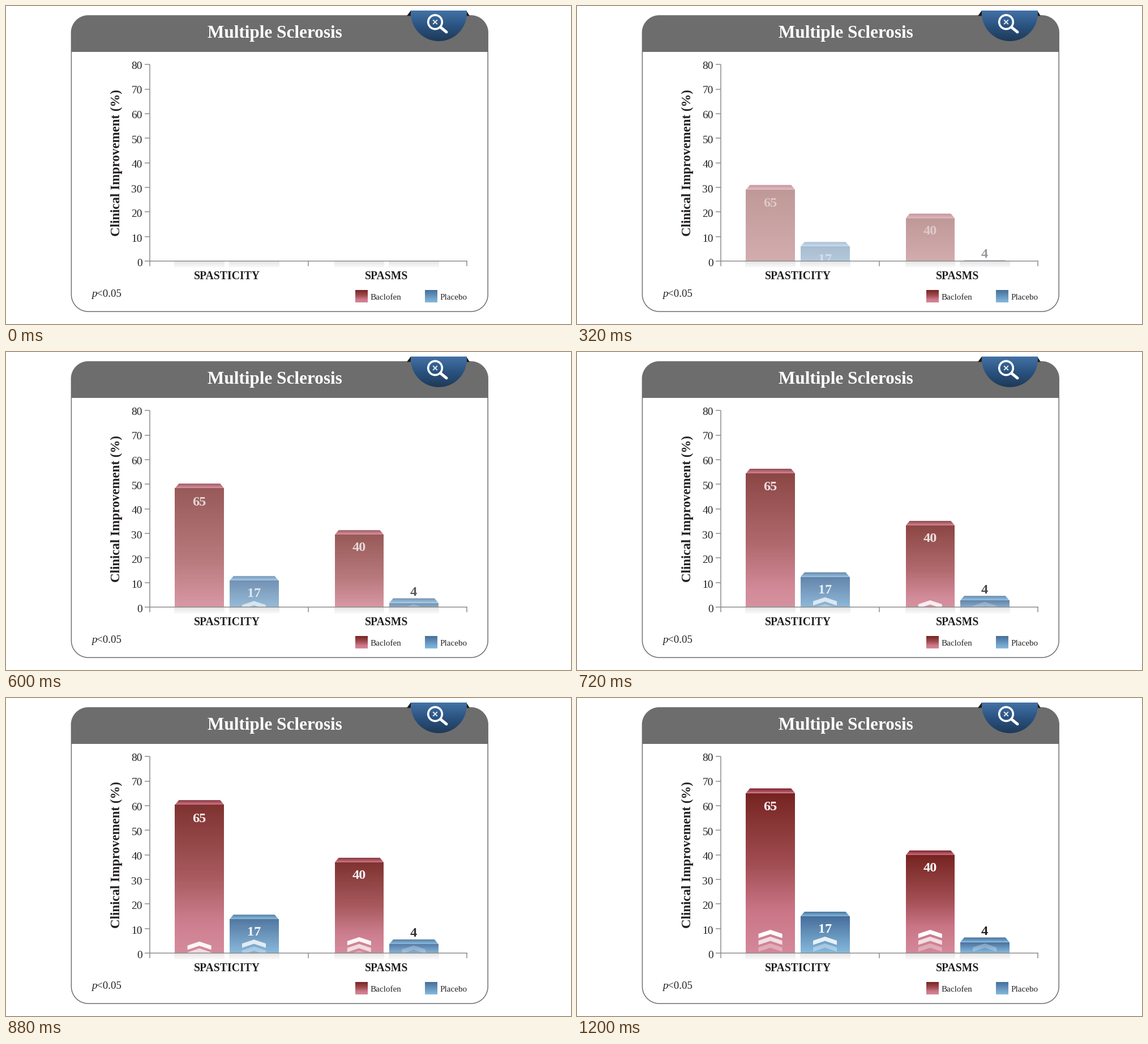
A matplotlib script that plays this animation: 998 px wide and 561 px high, repeating every 8 s.

```python
import numpy as np
import matplotlib.pyplot as plt
from matplotlib.animation import FuncAnimation
from matplotlib.patches import Circle, Polygon, Rectangle
from matplotlib.path import Path
from matplotlib.transforms import Affine2D

W, H, DPI = 998, 561, 64
STEP_MS, FRAMES, RISE = 40, 200, 30
BASE = 450

GREY = "#6d6d6d"
AXIS = "#8c8c8c"
INK = "#231f20"
RED = [(0, (118, 36, 33)), (.45, (162, 78, 83)), (.73, (202, 117, 134)), (1, (212, 137, 155))]
BLUE = [(0, (70, 110, 155)), (1, (134, 186, 222))]
RED_CAP = [(0, (112, 30, 34)), (1, (208, 108, 130))]
BLUE_CAP = [(0, (68, 108, 152)), (1, (130, 184, 220))]
BADGE = [(0, (68, 114, 166)), (.45, (44, 86, 132)), (1, (30, 57, 88))]
SHADE = [(0, (229, 229, 229)), (1, (249, 249, 249))]

plt.rcParams["font.family"] = "Liberation Serif"
fig = plt.figure(figsize=(W / DPI, H / DPI), dpi=DPI, facecolor="white")
ax = fig.add_axes([0, 0, 1, 1])
ax.set_xlim(0, W)
ax.set_ylim(H, 0)
ax.axis("off")


def px(size):
    return size * 72 / DPI


def gradient(points, stops, z, trans=None):
    """Fill a polygon with a vertical gradient."""
    trans = trans or ax.transData
    pts = np.array(points, float)
    (x0, y0), (x1, y1) = pts.min(0), pts.max(0)
    pos = [s[0] for s in stops]
    cols = np.array([s[1] for s in stops]) / 255
    t = np.linspace(0, 1, 256)
    ramp = np.stack([np.interp(t, pos, cols[:, k]) for k in range(3)], axis=1)
    image = ax.imshow(np.repeat(ramp[:, None], 2, axis=1), extent=(x0, x1, y1, y0),
                      aspect="auto", interpolation="nearest", zorder=z, transform=trans)
    image.set_clip_path(Path(np.vstack([pts, pts[:1]])), trans)


def box(x0, y0, x1, y1):
    return [(x0, y0), (x1, y0), (x1, y1), (x0, y1)]


def arc(cx, cy, r, start, end):
    a = np.radians(np.linspace(start, end, 60))
    return np.column_stack([cx + r * np.cos(a), cy + r * np.sin(a)])


def round_box(x0, y0, x1, y1, r):
    return np.vstack([arc(x1 - r, y1 - r, r, 0, 90), arc(x0 + r, y1 - r, r, 90, 180),
                      arc(x0 + r, y0 + r, r, 180, 270), arc(x1 - r, y0 + r, r, 270, 360)])


def label(x, y, s, size, color=INK, z=8, **kw):
    return ax.text(x, y, s, fontsize=px(size), color=color, zorder=z, va="baseline", **kw)


def line(xs, ys, color=AXIS, width=1.5, z=7, cap="butt"):
    ax.plot(xs, ys, color=color, lw=px(width), zorder=z, solid_capstyle=cap)


def draw_panel():
    outline = round_box(115.4, 17, 851.2, 539, 30)
    header = ax.add_patch(Polygon(outline, fc=GREY, ec="none", zorder=6))
    header.set_clip_path(Rectangle((100, 10), 770, 71.3, transform=ax.transData))
    ax.add_patch(Polygon(outline, fc="none", ec=GREY, lw=px(1.5), zorder=6))
    label(474.5, 55.5, "Multiple Sclerosis", 31.2, "white", weight="bold", ha="center")


def draw_badge():
    for side in ([(708, 17.5), (715, 8), (715, 17.5)], [(813, 8), (819, 17.5), (813, 17.5)]):
        ax.add_patch(Polygon(side, fc="#1a1a1a", ec="none", zorder=8))
    gradient([(715, 8), (814, 8), *arc(764.5, 12.5, 49.5, 0, 180)], BADGE, 9)
    ax.add_patch(Circle((758, 28.3), 12.3, fc="none", ec="white", lw=px(3.6), zorder=10))
    line([767.5, 778], [37.5, 46], "white", 5, 10, "round")
    for d in (-1, 1):
        line([754.2, 761.8], [28.3 - 3.8 * d, 28.3 + 3.8 * d], "#dfe8f2", 2, 10)


def draw_axes():
    line([254, 254], [103, 458.5])
    line([254, 814.6], [BASE, BASE])
    for x in (534, 814):
        line([x, x], [BASE, 458.5])
    for k in range(9):
        y = BASE - 43.33 * k
        line([245, 254], [y, y])
        label(241, 459.3 - 43.55 * k, str(10 * k), 19.4, ha="right")
    label(201, 276.5, "Clinical Improvement (%)", 22.9, weight="bold",
          rotation=90, rotation_mode="anchor", ha="center")
    label(390, 482, "SPASTICITY", 19.7, weight="bold", ha="center")
    label(672.5, 482, "SPASMS", 19.7, weight="bold", ha="center")


def draw_legend():
    label(151, 513, "p", 18.7, style="italic")
    label(160.5, 513, "<0.05", 18.9)
    for x, name, stops in ((617, "Baclofen", RED), (740, "Placebo", BLUE)):
        gradient(box(x, 501, x + 21.7, 523), stops, 7)
        label(x + 27, 517.5, name, 15)


class Bar:
    """A capped bar that rises from behind the baseline."""

    def __init__(self, x, top, travel, value, value_y, color, stops, cap, chevrons):
        self.travel = travel
        self.shift = Affine2D()
        trans = self.shift + ax.transData
        x1, mid = x + 86.8, x + 43.2
        gradient(box(x, top + 8, x1, BASE), stops, 1, trans)
        gradient([(x + 7, top), (x1 - 7, top), (x1, top + 8.2), (x, top + 8.2)], cap, 2, trans)
        gradient(box(x - 1, BASE, x1 + 1, 460.5), SHADE, 6)

        # Marks sit above the veil and fade in on their own.
        self.marks = [(label(mid, value_y, value, 24.2, color, 4.5, weight="bold",
                             ha="center", transform=trans), 1)]
        for y, alpha in chevrons:
            shape = [(mid - 21, y + 7), (mid, y), (mid + 21, y + 7),
                     (mid + 21, y + 14.5), (mid, y + 7.5), (mid - 21, y + 14.5)]
            patch = Polygon(shape, fc="white", ec="none", zorder=4.4, transform=trans)
            self.marks.append((ax.add_patch(patch), alpha))

    def rise(self, p):
        self.shift.clear().translate(0, self.travel * (1 - p))
        for mark, alpha in self.marks:
            mark.set_alpha(alpha * p)


draw_panel()
draw_badge()
draw_axes()
draw_legend()

bars = [
    Bar(298.4, 159.5, 290.5, "65", 198, "white", RED, RED_CAP,
        [(409, 1), (421, .75), (433, .32)]),
    Bar(394.8, 377, 73, "17", 414, "white", BLUE, BLUE_CAP, [(421, .85), (433, .35)]),
    Bar(580.6, 269, 181, "40", 306, "white", RED, RED_CAP,
        [(409, 1), (421, .75), (433, .32)]),
    Bar(677, 422.5, 48, "4", 418, INK, BLUE, BLUE_CAP, [(433, .28)]),
]

# The veil fades the bars in; the mask hides what is below the baseline.
veil = ax.add_patch(Rectangle((290, 90), 482, BASE - 90, fc="white", ec="none", zorder=4))
ax.add_patch(Rectangle((290, BASE), 482, H - BASE, fc="white", ec="none", zorder=5))


def update(i):
    u = min(i / RISE, 1) if i > 1 else 0
    p = 1 - (1 - u) ** 2
    for bar in bars:
        bar.rise(p)
    veil.set_alpha(1 - p)
    return []


anim = FuncAnimation(fig, update, frames=FRAMES, interval=STEP_MS, repeat=True, repeat_delay=0)
plt.show()
```
